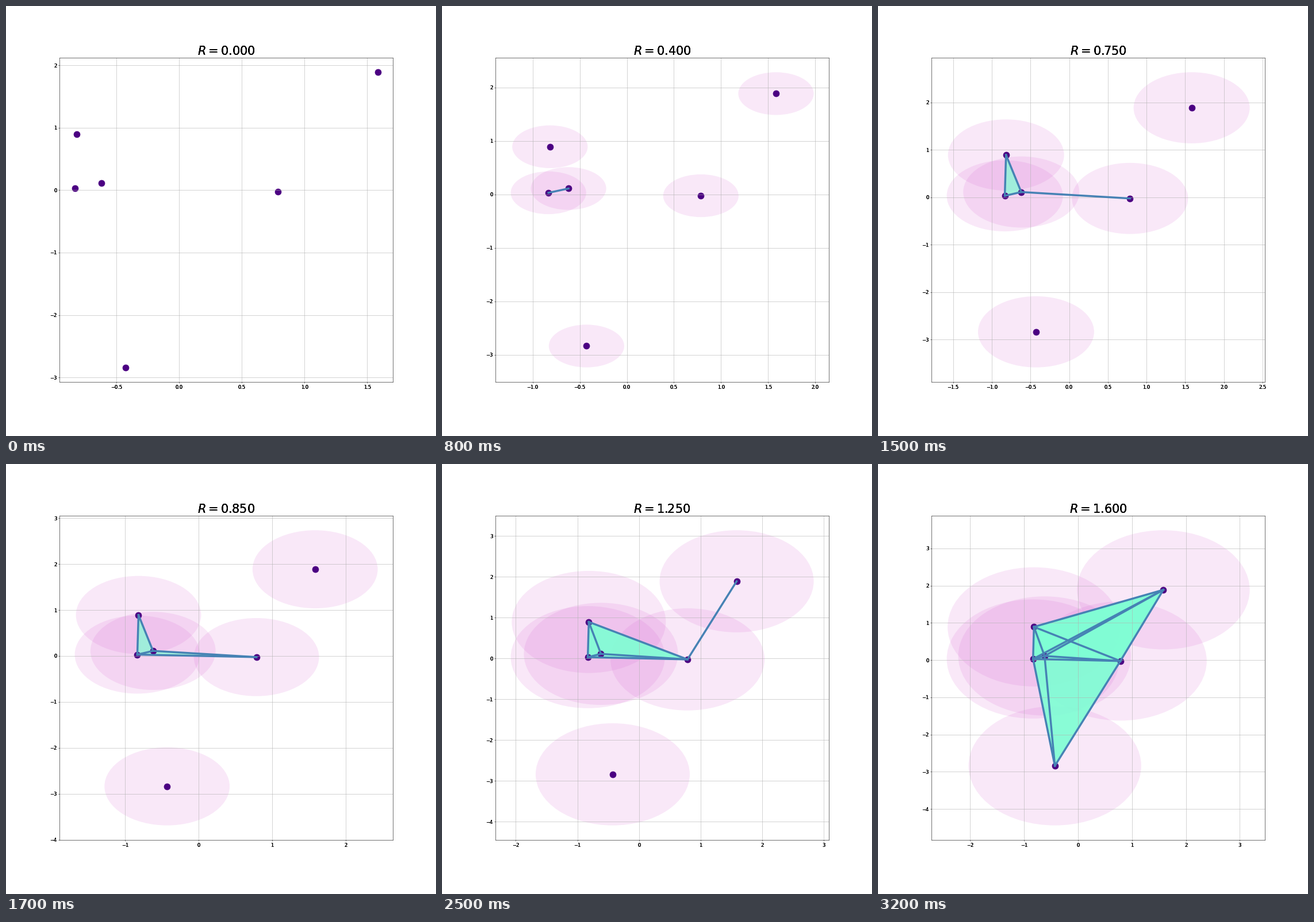
A matplotlib script that plays this animation: 748 by 748 pixels, repeating every 3300 ms.

```python
from itertools import combinations

import numpy as np
import matplotlib.pyplot as plt
from matplotlib.animation import FuncAnimation
from matplotlib.patches import Circle, Polygon

SIZE, DPI = 748, 50
FRAMES, INTERVAL, STEP = 33, 100, 0.05
LEFT, RIGHT, TOP, BOTTOM = 93.25, 672.9, 89.56, 654.3   # axes box in pixels

POINTS = np.array([
    (-0.832, 0.031), (-0.619, 0.111), (-0.816, 0.893),
    (0.786, -0.024), (1.583, 1.888), (-0.428, -2.838),
])

plt.rcParams.update({
    "font.family": "DejaVu Sans",
    "mathtext.fontset": "dejavusans",
    "xtick.labelsize": 12,
    "ytick.labelsize": 12,
})

fig, ax = plt.subplots(figsize=(SIZE / DPI, SIZE / DPI), dpi=DPI, facecolor="white")
fig.subplots_adjust(left=LEFT / SIZE, right=RIGHT / SIZE,
                    bottom=1 - BOTTOM / SIZE, top=1 - TOP / SIZE)


def harden(img, dpi):
    """Thicken soft glyph edges."""
    out = np.array(img, dtype=float)
    out[..., :3] = 0
    out[..., 3] = np.clip(2 * out[..., 3], 0, 1)
    return out, 0, 0


def fit_limits(radius):
    low, high = POINTS.min(axis=0) - radius, POINTS.max(axis=0) + radius
    pad = 0.05 * (high - low)
    (x0, y0), (x1, y1) = low - pad, high + pad
    ax.set_xlim(x0, x1)
    ax.set_ylim(y0, y1)


def is_simplex(corners, radius):
    return all(np.linalg.norm(p - q) <= 2 * radius
               for p, q in combinations(corners, 2))


def draw(i):
    radius = i * STEP
    ax.clear()

    if radius > 0:
        for p in POINTS:
            ax.add_patch(Circle(p, radius, color="orchid", alpha=0.16, lw=0))
    for tri in combinations(POINTS, 3):
        if is_simplex(tri, radius):
            ax.add_patch(Polygon(tri, facecolor="aquamarine", alpha=0.7, lw=0))
    ax.scatter(*POINTS.T, s=250, color="indigo")
    for edge in combinations(POINTS, 2):
        if is_simplex(edge, radius):
            ax.plot(*np.transpose(edge), color="steelblue", lw=5)

    fit_limits(radius)
    ax.grid(True)
    title = ax.set_title(f"$R = {radius:.3f}$", fontsize=30)
    for text in [title, *ax.get_xticklabels(), *ax.get_yticklabels()]:
        text.set_agg_filter(harden)


anim = FuncAnimation(fig, draw, frames=FRAMES, init_func=lambda: draw(0),
                     interval=INTERVAL, repeat=True, repeat_delay=0)

plt.show()
```
